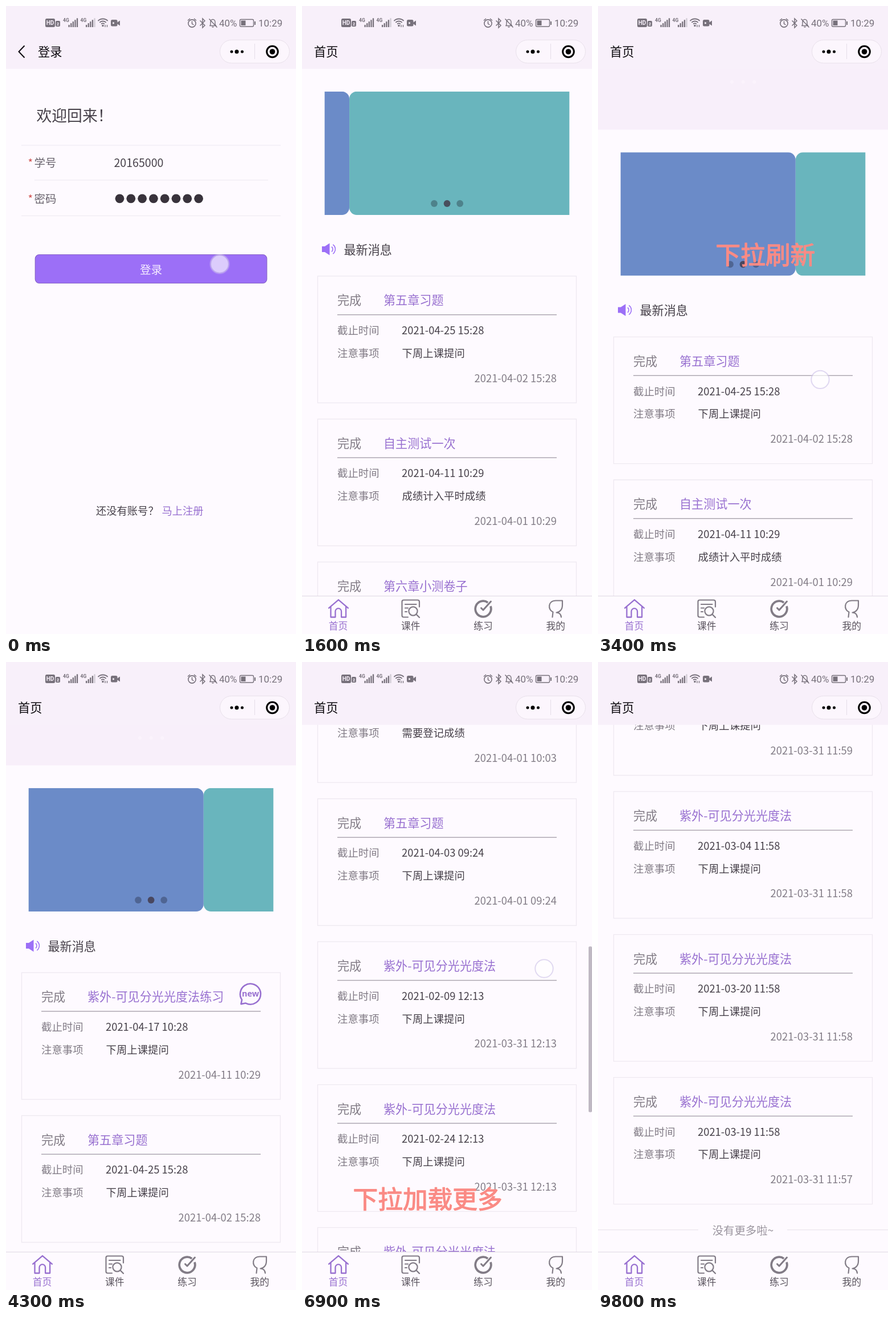
Recreate the animation shown at these times as an HTML page with a canvas. Size 509x1100 px, loop 9900 ms.

```html
<!DOCTYPE html>
<html lang="zh-CN">
<head>
<meta charset="utf-8">
<title>首页</title>
<style>
html, body { margin: 0; width: 100%; height: 100%; overflow: hidden; background: #fefaff; }
canvas { display: block; width: 509px; height: 1100px; }
</style>
</head>
<body>
<canvas id="stage"></canvas>
<script>
const W = 509, H = 1100, LOOP = 9900, STEP = 100, HOME_AT = 600;
const TOP = 110, BOTTOM = 1033, PITCH = 250.4;
const CJK = '"Noto Sans CJK SC", "Noto Sans CJK", sans-serif';
const BG = '#fefaff', BAR = '#f8f0fa', DARK = '#464049', GRAY = '#827c86',
      PURPLE = '#9870d0', VIVID = '#9c6ff7', STATUS = '#77717b', LINE = '#eee9f1',
      CORAL = '#fa8b85';

const canvas = document.getElementById('stage');
const g = canvas.getContext('2d');
const dpr = window.devicePixelRatio || 1;
canvas.width = W * dpr;
canvas.height = H * dpr;

// ---- data ----
const UV = '紫外-可见分光光度法', ASK = '下周上课提问';
const cards = [
  [UV + '练习', '04-17 10:28', ASK, '04-11 10:29'],
  ['第五章习题', '04-25 15:28', ASK, '04-02 15:28'],
  ['自主测试一次', '04-11 10:29', '成绩计入平时成绩', '04-01 10:29'],
  ['第六章小测卷子', '04-08 10:03', '需要登记成绩', '04-01 10:03'],
  ['第五章习题', '04-03 09:24', ASK, '04-01 09:24'],
  [UV, '02-09 12:13', ASK, '03-31 12:13'],
  [UV, '02-24 12:13', ASK, '03-31 12:13'],
  [UV, '03-12 12:10', ASK, '03-31 12:10'],
  [UV, '03-10 12:06', ASK, '03-31 12:06'],
  [UV, '03-18 12:02', ASK, '03-31 12:02'],
  [UV, '03-11 12:00', ASK, '03-31 12:00'],
  [UV, '03-05 11:59', ASK, '03-31 11:59'],
  [UV, '03-04 11:58', ASK, '03-31 11:58'],
  [UV, '03-20 11:58', ASK, '03-31 11:58'],
  [UV, '03-19 11:58', ASK, '03-31 11:57']
];
const slides = ['#b3aefe', '#6b8bc8', '#69b5bd'];
const captions = [
  [2200, 3800, '下拉刷新', 206.5, 435.3, 43.7, CJK],
  [4500, 5900, 'new', 331, 443.5, 46.4, '"Liberation Sans", Arial, sans-serif'],
  [6200, 7500, '下拉加载更多', 89.5, 940.3, 43.7, CJK]
];

// ---- motion: keys are [time, value, ease-out power] ----
const scrollKeys = [[5050, 0], [5300, 231.3, 1], [5430, 350, 1], [5950, 600, 2.5], [6100, 600, 1],
  [6350, 840, 1], [6750, 1100, 2.5], [6800, 1100, 1], [6900, 1235.2, 1], [7000, 1400, 1],
  [7250, 1800, 2], [7300, 1800, 1], [7450, 2200, 1], [8050, 3251, 3]];
const pullKeys = [[2950, 0], [3450, 110, 1.5], [3650, 71, 2], [4450, 71, 1], [4700, 0, 2]];
// drags are [start, end, x, y, time at which y holds]
const drags = [[5050, 5430, 395, 608, 5300], [6100, 6350, 410, 560, 6220],
  [6800, 7000, 425, 537, 6900], [7300, 7450, 415, 500, 7400]];

function track(keys, t) {
  if (t <= keys[0][0]) return keys[0][1];
  for (let i = 1; i < keys.length; i++) {
    const [t1, v1, n] = keys[i], [t0, v0] = keys[i - 1];
    if (t < t1) return v0 + (v1 - v0) * (1 - Math.pow(1 - (t - t0) / (t1 - t0), n));
  }
  return keys[keys.length - 1][1];
}

const scrollAt = t => track(scrollKeys, t);

// The carousel runs 0, 1, 2 and back, and stands still while the page refreshes.
function carousel(t) {
  const hold = 3211, step = 619;
  const u = t < hold ? t : Math.max(hold, t - 3 * step);
  const q = Math.max(0, (u - 501) / step);
  const from = Math.floor(q) % 3, to = (from + 1) % 3, f = q % 1;
  const e = f < 0.5 ? 2 * f * f : 1 - 2 * (1 - f) * (1 - f);
  return { pos: from + (to - from) * e, dot: from };
}

// ---- drawing helpers ----
function text(s, x, cy, size, color, align = 'left', family = CJK, weight = 400) {
  g.font = `${weight} ${size}px ${family}`;
  g.textAlign = align;
  g.fillStyle = color;
  g.fillText(s, x, cy + size * 0.38);
}
function rect(x, y, w, h, color) {
  g.fillStyle = color;
  g.fillRect(x, y, w, h);
}
function round(x, y, w, h, r, fill, stroke, lw = 1) {
  g.beginPath();
  g.roundRect(x, y, w, h, r);
  paint(fill, stroke, lw);
}
function circle(x, y, r, fill, stroke, lw) {
  arc(x, y, r, 0, 7, fill, stroke, lw);
}
function arc(x, y, r, a, b, fill, stroke, lw) {
  g.beginPath();
  g.arc(x, y, r, a, b);
  paint(fill, stroke, lw);
}
function paint(fill, stroke, lw) {
  if (fill) { g.fillStyle = fill; g.fill(); }
  if (stroke) { g.strokeStyle = stroke; g.lineWidth = lw; g.stroke(); }
}
function path(d, fill, stroke, lw) {
  const p = new Path2D(d);
  if (fill) { g.fillStyle = fill; g.fill(p); }
  if (stroke) { g.strokeStyle = stroke; g.lineWidth = lw; g.stroke(p); }
}

// ---- fixed chrome ----
function signal(x, full) {
  text('4G', x, 25, 8.5, STATUS, 'left', 'Roboto, sans-serif', 700);
  for (let i = 0; i < 5; i++) {
    const h = 4 + i * 2.9;
    rect(x + 9.5 + i * 3.6, 37 - h, 2.3, h, i < full ? STATUS : '#d0cad3');
  }
}

function statusBar() {
  const roboto = 'Roboto, sans-serif';
  round(69, 22, 17, 15, 2.5, STATUS);
  text('HD', 77.5, 29.5, 10, BAR, 'center', roboto, 700);
  round(87, 26, 8, 10, 2, STATUS);
  text('2', 91, 31, 8, BAR, 'center', roboto, 700);
  signal(100, 5);
  signal(130.5, 4);
  for (const r of [4, 8, 12]) arc(170, 34.5, r, -2.36, -0.78, null, STATUS, 1.8);
  circle(170, 34.5, 1.8, STATUS);
  path('M174 33v4M177.5 33v4', null, STATUS, 1.3);
  round(184, 24, 11.5, 11.5, 2.5, STATUS);
  path('M195 29l5-3.5v9l-5-3.5z', STATUS);
  circle(188.5, 29.8, 1.6, BAR);

  circle(326.5, 30.5, 6.6, null, STATUS, 1.6);
  path('M326.5 26.5v4.5l3 2M319 25.5l4-3.5M334 25.5l-4-3.5', null, STATUS, 1.5);
  path('M340.5 25.5l8.5 8.5l-4 4V22l4 4l-8.5 8.5', null, STATUS, 1.5);
  path('M358 34.5h10.5l-1.5-2.5v-4a4 4.5 0 0 0-8 0v4zM361.5 36.8h3M356.5 22.5l14 15', null, STATUS, 1.4);
  text('40%', 374, 29.8, 17, STATUS, 'left', roboto);
  round(410.5, 23.5, 24, 12.5, 2, null, STATUS, 1.4);
  rect(412.5, 25.5, 8, 8.5, STATUS);
  rect(436, 27, 2, 6, STATUS);
  text('10:29', 443, 29.8, 17, STATUS, 'left', roboto);
}

function header(title, back) {
  rect(0, 0, W, TOP, BAR);
  statusBar();
  if (back) path('M32.5 69.5L22.5 80l10 10.5', null, '#100c12', 2);
  text(title, back ? 56 : 21, 80.3, 21.2, '#0c090e');
  round(375.5, 59.5, 122, 40.5, 20.25, '#fcf6fd', '#e9e1eb');
  rect(436, 66, 1, 27, '#e6dee8');
  circle(396, 80, 2.5, '#000');
  circle(405, 80, 3.5, '#000');
  circle(414.5, 80, 2.5, '#000');
  circle(467.5, 80, 9.8, null, '#000', 3);
  circle(467.5, 80, 4.8, '#000');
}

function tabBar() {
  rect(0, BOTTOM, W, H - BOTTOM, BG);
  rect(0, BOTTOM, W, 1, '#dfd9e2');
  g.lineJoin = g.lineCap = 'round';
  path('M47 1054.5L64 1040l17 14.5M50.5 1052v18.5h8v-10a5.3 5.3 0 0 1 10.6 0v10h8V1052', null, PURPLE, 2.3);
  path('M186 1070.5h-7.500a3 3 0 0 1-3-3v-24a3 3 0 0 1 3-3h24.500a3 3 0 0 1 3 3v9M181 1048h19.500M181 1054.500h5M181 1061h3', null, GRAY, 2.2);
  circle(195, 1060, 7.6, null, GRAY, 2.2);
  path('M200.5 1065.5l5.5 5.5', null, GRAY, 2.4);
  g.lineCap = 'butt';
  arc(318, 1056, 13.8, -0.35, 5.35, null, GRAY, 3.8);
  g.lineCap = 'round';
  path('M314.5 1054.5l3.5 3.5l13.500-15', null, GRAY, 3);
  path('M440.5 1061.5c-9.500-4-9-20 5-20h11.500v8c0 8-5 12.500-10.500 13c5 0 8 3 8.500 8M440.5 1061.5l-1 9', null, GRAY, 2.2);
  g.lineJoin = 'miter';
  g.lineCap = 'butt';
  ['首页', '课件', '练习', '我的'].forEach((s, i) =>
    text(s, 63.6 + i * 127.2, 1086, 16.8, i ? '#5a545e' : PURPLE, 'center'));
}

// ---- pages ----
function login() {
  header('登录', true);
  text('欢迎回来！', 53.5, 191.5, 26.8, DARK);
  rect(27, 243.5, 455, 1, LINE);
  rect(50, 304.5, 410, 1, LINE);
  rect(27, 367, 455, 1, LINE);
  [['学号', 275], ['密码', 337.5]].forEach(([s, y]) => {
    text('*', 38.5, y, 18.5, '#d0504f');
    text(s, 49.5, y, 19.4, '#6a646e');
  });
  text('20165000', 189.5, 275, 19.6, DARK);
  for (let i = 0; i < 8; i++) circle(199.5 + i * 19.8, 337.3, 7.9, '#39333c');
  round(51.3, 435.5, 406.5, 50, 7, VIVID, '#8763c8', 1.2);
  text('登录', 254.5, 461.5, 19.6, '#f6edff', 'center');
  text('还没有账号？', 158, 884, 18.3, DARK);
  text('马上注册', 273.5, 884, 18.3, PURPLE);
}

function swiper(dy, t) {
  const { pos, dot } = carousel(t);
  g.save();
  g.beginPath();
  g.rect(39.7, 149.8 + dy, 429.6, 216.2);
  g.clip();
  slides.forEach((c, i) => round(39.7 + 430 * (i - pos), 149.8 + dy, 430, 216.2, 13, c));
  g.restore();
  for (let i = 0; i < 3; i++)
    circle(232 + i * 22.6, 346 + dy, 5.9, i === dot ? 'rgba(66,56,72,.82)' : 'rgba(20,15,30,.31)');
}

function speaker(y) {
  path(`M35 ${y - 5}h5l8.5-5.5v21l-8.5-5.5h-5z`, VIVID);
  arc(48.5, y, 5.5, -0.9, 0.9, null, VIVID, 1.6);
  arc(48.5, y, 10, -0.95, 0.95, null, VIVID, 1.6);
}

function badge(x, y) {
  g.lineJoin = 'round';
  g.beginPath();
  g.arc(x, y, 18, 2.55, 2.05 + Math.PI * 2);
  g.lineTo(x - 16.5, y + 17.5);
  g.closePath();
  paint(null, PURPLE, 2.6);
  g.lineJoin = 'miter';
  text('new', x, y - 1.5, 14.5, PURPLE, 'center', '"Open Sans", sans-serif', 700);
}

function card([title, due, note, date], y, fresh) {
  if (y > BOTTOM || y < TOP - 230) return;
  round(27.5, y + 0.5, 454, 222, 0, null, LINE, 1.3);
  text('完成', 62, y + 42.7, 21.1, GRAY);
  text(title, 143, y + 42.7, 21.1, PURPLE);
  rect(62, y + 67.5, 385, 1.4, '#a9a3ad');
  text('截止时间', 62, y + 95.5, 18.4, GRAY);
  text('2021-' + due, 175, y + 95.5, 18.4, DARK);
  text('注意事项', 62, y + 135.3, 18.4, GRAY);
  text(note, 175.5, y + 135.3, 18.4, DARK);
  text('2021-' + date, 447, y + 179, 18.4, GRAY, 'right');
  if (fresh) badge(429, y + 38);
}

function scrollbar(t, scroll, count) {
  if (t < 5100 || t > 9250) return;
  const view = BOTTOM - TOP, k = view / (432 + count * PITCH);
  g.globalAlpha = Math.min(1, (9250 - t) / 250);
  round(503, TOP + scroll * k, 6, view * k, 2, '#bfb9c3');
  g.globalAlpha = 1;
}

function home(t) {
  const scroll = scrollAt(t), pull = track(pullKeys, t), dy = pull - scroll;
  const count = scroll > 1960 ? 15 : scroll > 640 ? 10 : 5;
  const first = t < 4000 ? 1 : 0;

  if (pull > 0) {
    rect(0, TOP, W, pull, '#f8effa');
    if (pull > 30) for (let i = 0; i < 3; i++) circle(235 + i * 19.7, 133, 3, '#fbf3fc');
  }
  if (dy > -300) {
    swiper(dy, t);
    speaker(426 + dy);
    text('最新消息', 73.5, 426.5 + dy, 21.1, DARK);
  }
  cards.slice(first, first + count).forEach((c, i) =>
    card(c, 472.6 + i * PITCH + dy, !first && i === 0));
  if (count === 15) {
    const y = 472.6 + 14 * PITCH + dy + 268;
    rect(0, y - 1, 176, 1, '#e5dfe8');
    rect(332, y - 1, 177, 1, '#e5dfe8');
    text('没有更多啦~', 254.5, y, 19.4, '#9a949e', 'center');
  }
  scrollbar(t, scroll, count);
  header('首页', false);
  tabBar();
}

// ---- overlays ----
function touch(x, y) {
  circle(x, y, 18, 'rgba(255,255,255,.12)');
  circle(x, y, 15, 'rgba(255,255,255,.6)');
  circle(x, y, 15.7, null, 'rgba(205,193,232,.6)', 2);
}

function touches(t) {
  if (t < 250) touch(375, 452);
  if (t >= 2950 && t < 3450) touch(390, 420 + track(pullKeys, t) * 2.2);
  for (const [a, b, x, y, at] of drags)
    if (t >= a && t < b) touch(x, y + scrollAt(at) - scrollAt(t));
}

function caption(t, [from, to, s, x, cy, size, family]) {
  if (t < from || t >= to) return;
  text(s, x, cy, size, CORAL, 'left', family, 500);
  g.strokeStyle = CORAL;
  g.lineWidth = 1.3;
  g.lineJoin = 'round';
  g.strokeText(s, x, cy + size * 0.38);
  g.lineJoin = 'miter';
}

function draw(now) {
  const t = Math.floor((now % LOOP) / STEP) * STEP;
  g.setTransform(dpr, 0, 0, dpr, 0, 0);
  rect(0, 0, W, H, BG);
  if (t < HOME_AT) login(); else home(t);
  touches(t);
  captions.forEach(c => caption(t, c));
}

const start = performance.now();
function frame() {
  draw(performance.now() - start);
  requestAnimationFrame(frame);
}
frame();
</script>
</body>
</html>
```
